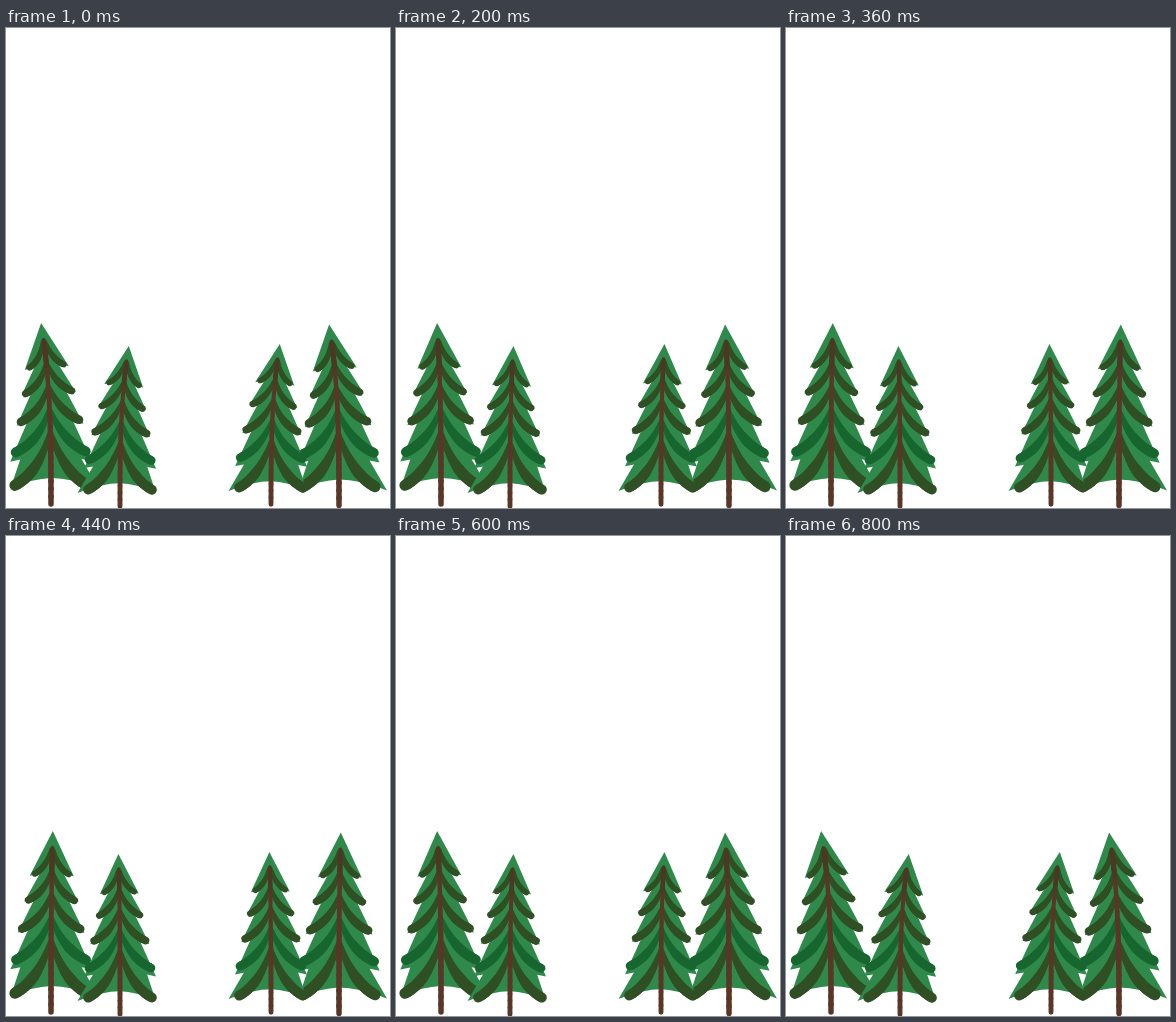
These frames come from a looping animation (384 px wide and 480 px high, 840 ms). An HTML page with a canvas:

```html
<!DOCTYPE html>
<html lang="en">
<head>
<meta charset="utf-8">
<title>Swaying pines</title>
<style>
  html, body { margin: 0; width: 100%; height: 100%; overflow: hidden; background: #fff; }
  canvas { display: block; }
</style>
</head>
<body>
<canvas id="stage" width="384" height="480"></canvas>
<script>
const ctx = document.getElementById('stage').getContext('2d');

const LOOP = 840, STEP = 40, PERIOD = 800;
const LEAF = '#2e894b', DARK = '#18662f', OLIVE = '#304f24', TRUNK = '#5a3627', BARK = '#4e3823';
const HEIGHT = 183, SWAY = 6, LEAN = -0.65, TIERS = 4, SMALL = 0.885;

// Tree space: the foot of the trunk is (0, 0) and y is negative upwards.
// The top leans over while the foot stays planted.
function bend(x, y, k) {
  const h = Math.max(0, -y / HEIGHT);
  return [x + k * SWAY * h ** 3, y + k * x * 3 * SWAY * h * h / HEIGHT];
}

// Quadratic brush stroke that swells towards its end
function brush(color, [x0, y0], [cx, cy], [x1, y1], w0, w1, k) {
  const n = 18;
  const mix = (a, b, c, u) => (1 - u) ** 2 * a + 2 * u * (1 - u) * b + u * u * c;
  const at = u => bend(mix(x0, cx, x1, u), mix(y0, cy, y1, u), k);
  ctx.strokeStyle = color;
  for (let i = 0; i < n; i++) {
    const u = (i + 1) / n;
    ctx.lineWidth = w0 + (w1 - w0) * Math.min(1, u * 1.6);
    ctx.beginPath();
    ctx.moveTo(...at(i / n));
    ctx.lineTo(...at(u));
    ctx.stroke();
  }
}

// Outer point of each tier followed by the notch above the next one
function edge(side) {
  const pts = [];
  for (let i = 0; i < TIERS; i++) {
    const drop = 23 * i + 2.7 * i * i;
    const reach = 22 + drop / 5;
    pts.push([side * reach, drop - 138], [side * (reach - 10), drop - 140]);
  }
  return pts;
}

function silhouette(k) {
  const p = (x, y) => bend(x, y, k);
  const line = pts => pts.forEach(([x, y]) => ctx.lineTo(...p(x, y)));
  ctx.fillStyle = LEAF;
  ctx.beginPath();
  ctx.moveTo(...p(0, -HEIGHT));
  line(edge(1));
  ctx.lineTo(...p(48, -17));
  ctx.quadraticCurveTo(...p(20, -28), ...p(0, -28));
  ctx.quadraticCurveTo(...p(-18, -27), ...p(-40, -19));
  line(edge(-1).reverse());
  ctx.fill();
}

function boughs(k) {
  for (let i = TIERS; i >= 0; i--) {
    const top = 23 * i - 164;
    const end = 25 * i + 1.2 * i * i - 140;
    const reach = Math.min(17 + 6 * i, 36);
    for (const side of [-1, 1]) {
      brush(i === 3 ? DARK : OLIVE,
        [side, top],
        [side * reach * 0.35, top + 0.75 * (end - top)],
        [side * reach, end],
        4, 6 + 1.3 * i, k);
    }
  }
}

function tree(x, y, sx, sy, k) {
  ctx.save();
  ctx.translate(x, y);
  ctx.scale(sx, sy);
  silhouette(k);
  boughs(k);
  brush(TRUNK, [0, -144], [0, -70], [0, -2], 4, 5.5, k);
  brush(BARK, [0, -166], [0, -153], [0, -140], 4, 5, k);
  ctx.restore();
}

function frame(now) {
  const t = Math.floor(now % LOOP / STEP) * STEP;
  const k = LEAN - Math.cos(2 * Math.PI * t / PERIOD);
  ctx.fillStyle = '#fff';
  ctx.fillRect(0, 0, 384, 480);
  ctx.lineCap = 'round';
  tree(45, 478, 1, 1, k);
  tree(114, 480, -SMALL, SMALL, k);
  tree(333, 479.5, 1, 1, k);
  tree(265, 478, -SMALL, SMALL, k);
}

const start = performance.now();
function tick() {
  frame(performance.now() - start);
  requestAnimationFrame(tick);
}
tick();
</script>
</body>
</html>
```
